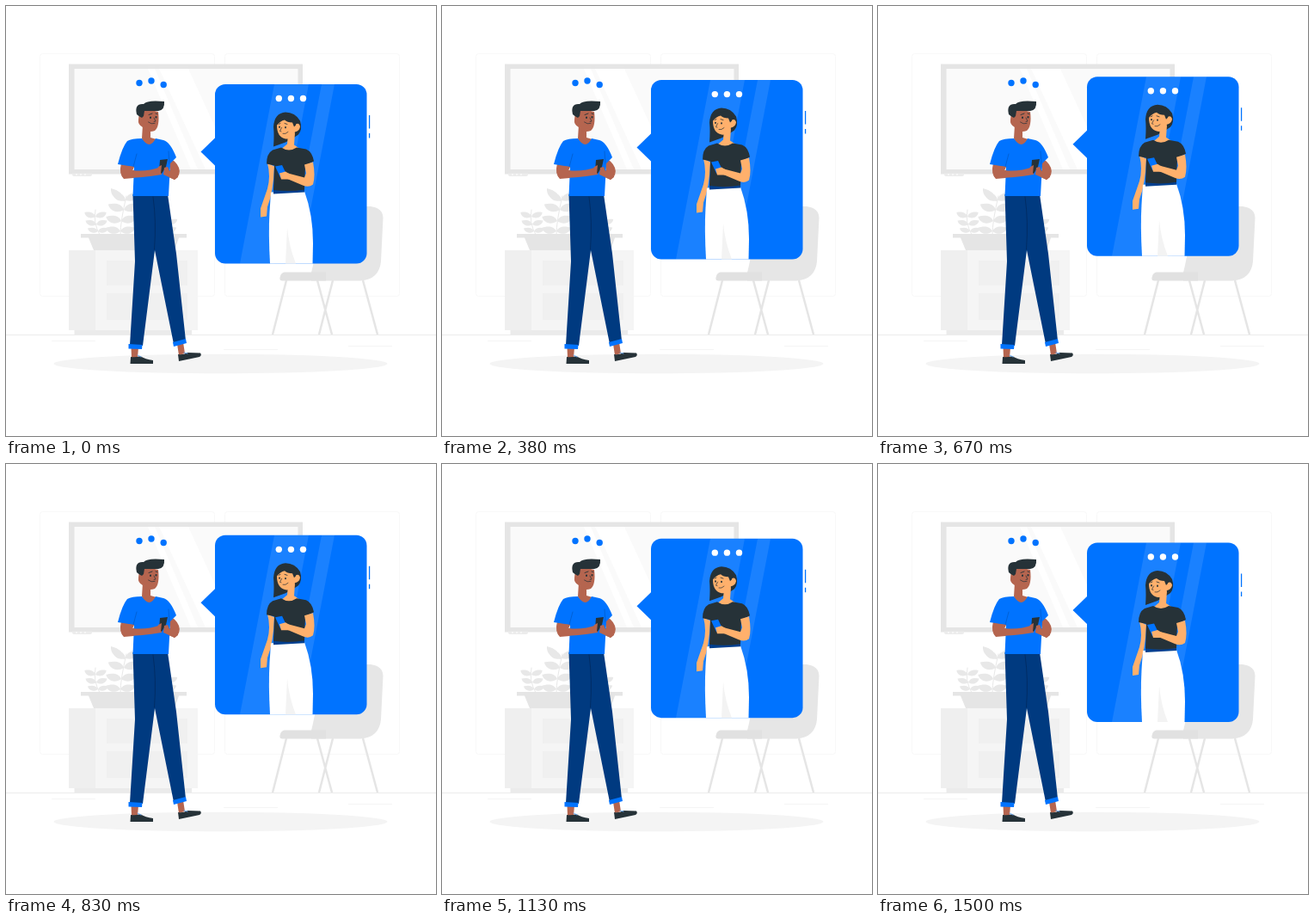
Recreate the animation shown at these times as an HTML page. Size 500 by 500 pixels, loop 1540 ms.

```html
<!DOCTYPE html>
<html lang="en">
<head>
<meta charset="utf-8">
<title>Video chat</title>
<style>
html, body { margin: 0; width: 100%; height: 100%; overflow: hidden; background: #fff; }
svg { display: block; width: 100%; height: 100%; }
.line { fill: none; stroke-linecap: round; stroke-linejoin: round; }
</style>
</head>
<body>
<svg viewBox="0 0 500 500">
  <defs>
    <path id="leaf" d="M0 0C2-7 9-8 16-7 15 0 8 4 0 0"/>
  </defs>

  <g id="room">
    <g fill="none" stroke="#f8f8f8">
      <rect x="39.5" y="55.5" width="203" height="282" rx="3"/>
      <rect x="254.5" y="55.5" width="203" height="282" rx="3"/>
    </g>
    <path d="M0 382.5H500" stroke="#ececec"/>
    <path d="M53 389.5H104M253 399.5H316M398 395.5H449" stroke="#f5f5f5"/>

    <path d="M73 67.500H345V195.500H73Z" fill="#e5e5e5"/>
    <path d="M79.500 73H339.500V190H79.500Z" fill="#fafafa"/>
    <path d="M165 73H173L223 190H215ZM178 73H212L266 190H232Z" fill="#fff"/>
    <path d="M77 194.500H100V196Q100 198 98 198H79Q77 198 77 196Z" fill="#ececec"/>
    <path d="M81 196H83M86 196H88M91 196H93" stroke="#fff"/>

    <path d="M104 284H223V377H104Z" fill="#f5f5f5"/>
    <path d="M73 284H104V377H73Z" fill="#efefef"/>
    <path d="M117 296H211V325H117ZM117 334H211V365H117Z" fill="#f0f0f0"/>
    <path d="M79.500 377H216V382H79.500Z" fill="#ebebeb"/>
    <g id="plants" fill="#e8e8e8">
      <path class="line" d="M109 266Q101 252 104 237M133 266Q133 250 140 221M184 266 190 246" stroke="#e8e8e8"/>
    </g>
    <path d="M87 265H210V269.500H201L196 284H102L96 269.500H87Z" fill="#e5e5e5"/>

    <path d="M326 319 310 382M362 319 379 382M380 319 364 382M415 319 432 382" stroke="#e5e5e5" stroke-width="2.500"/>
    <path d="M355 310Q360 290 366 250 370 234 390 233H424Q438 235 438.500 246L436 297Q434 318 412 319.500H355Z" fill="#e6e6e6"/>
    <path d="M324 309.500H372V319.500H321Q317 319 319 314 320 310 324 309.500Z" fill="#e1e1e1"/>
    <ellipse cx="249.500" cy="416" rx="194" ry="11.300" fill="#f4f4f4"/>
  </g>

  <g id="man">
    <g fill="#b5654f">
      <path d="M145.500 397H154L153 409H146ZM199 393 206 391 208 404 201 406Z"/>
      <path d="M159 138 168 145V153L175 155Q174 164 167 163 160 161 158 154Z"/>
      <path d="M155 124Q165 119 177 123 179 140 173 145 164 148 159 141Q153 138 154 132Z"/>
    </g>
    <path d="M152 126Q149 113 160 114 164 109 184 111 185 121 177 122 172 122 161 122L160 128 158 130Q154 128 152 126Z" fill="#263238"/>
    <g class="line" stroke="#263238">
      <path d="M166 126.500 170 125M174 125 176 125.500" stroke-width=".900"/>
      <path d="M168 129.500V130M174.500 129V129.500" stroke-width="2"/>
      <path d="M172 130 174 134 172 134.500M165.500 135Q169 138 173 136.500" stroke-width=".700"/>
    </g>

    <path d="M147.500 219H188L198 288 209 389 195 393 173 284 159 395 144 394 150 297Z" fill="#003a80"/>
    <path class="line" d="M171 222Q175 250 172.500 283" stroke="#00285a" stroke-width=".700"/>
    <path d="M142.500 393 158.500 394 158 399 142.500 398.500ZM194 391 209 387 210 392 195 396Z" fill="#0073ff"/>
    <path d="M145 408Q151 409 156 407 162 411 171 412V416H144.500ZM200 405Q206 406 211 403L226 403.500Q228 406 225 408L201 413Z" fill="#263238"/>
    <path class="line" d="M153 406 157 408M207 403 211 404" stroke="#70b1ff"/>

    <path d="M134 183Q131 195 137 201 158 200 180 196L179 188Q164 192 147 191L150 184Z" fill="#b5654f"/>
    <path d="M188 178Q196 177 201 188 204 196 196 202L187 198 183 194 185 188 191 191Z" fill="#b5654f"/>
    <path d="M158 154Q167 168 174 154L183 156Q191 158 198 176L191 183 189 221H147.500L149 187 130 184Q135 164 141 157 146 154 158 154Z" fill="#0073ff"/>
    <path class="line" d="M152 172 148 187M189 169 190 184" stroke="#0059c4" stroke-width=".700"/>
    <path d="M134 185.500Q132 196 137 200 158 200 181 196L180 187Q164 193 147 191L149 187Z" fill="#b5654f"/>
    <path d="M179 179 188 178 186 187 181 195 178 192Z" fill="#263238"/>
    <path d="M177 187 181 185 180 195 175 196ZM184 188 188 187 190 192 201 190 200 199 196 202 183 196Z" fill="#b5654f"/>
    <g fill="#0073ff">
      <circle cx="155" cy="89.500" r="3.700"/>
      <circle cx="169" cy="87" r="3.700"/>
      <circle cx="183.200" cy="91.500" r="3.700"/>
    </g>
  </g>

  <g id="call">
    <g fill="#0073ff">
      <rect x="243" y="91.500" width="176.500" height="208.500" rx="12"/>
      <path d="M244 153 226.500 170 244 187Z"/>
      <path d="M421.900 127.500H423.200V143H421.900ZM421.900 148.500H423.200V154H421.900Z"/>
    </g>
    <path d="M312 91.500H352L312 300H272ZM367 91.500H382L342 300H327Z" fill="#fff" opacity=".1"/>
    <g fill="#fff">
      <circle cx="317.300" cy="108" r="3.700"/>
      <circle cx="331.400" cy="108" r="3.700"/>
      <circle cx="345.500" cy="108" r="3.700"/>
    </g>

    <path d="M311 164Q312 151 311 141 312 125 325 124 336 124 342 134 345 144 340 150L334 154 325 159Z" fill="#263238"/>
    <g fill="#ffb06c">
      <path d="M304 183Q308 199 304 213L296 236V246L303 245 304 234Q311 216 312 187Z"/>
      <path d="M328 149 336 148 335 162 341 166Q334 173 320 167L327 161Z"/>
      <path d="M315 139Q318 133 327 131 335 133 335 139 341 135 342 141 341 146 336 147 334 156 325 155 315 153 315 139Z"/>
    </g>
    <path d="M314 140Q314 133 322 129L332 128Q339 132 337 139L335 141 333 136Q327 136 324 133 319 134 314 140Z" fill="#263238"/>
    <g class="line" stroke="#263238">
      <path d="M317 138 319 137M324 137 327 138" stroke-width=".800"/>
      <path d="M318 141V141.500M325 141.500V142" stroke-width="1.800"/>
      <path d="M320.500 142 318.500 146 320 146.500M322 149Q325 150 328 147" stroke-width=".700"/>
    </g>

    <path d="M308 217 347 216Q357 243 357 276L356.500 300H307Q305 265 306.500 240Z" fill="#fff"/>
    <path d="M327 258 325 300H337Q329 280 327 258Z" fill="#f3f3f3"/>
    <path d="M311 213 347 212V217L311 219Z" fill="#003f8f"/>
    <path d="M320 165Q329 171 338 165L349 167Q356 170 358 181L348 186 347 214Q329 217 311 214.500L312 186 303 184Q303 172 310 168Z" fill="#263238"/>
    <path d="M347 185 357 182Q360 198 357 208 352 212 345 209L326 201 328 195 347 200 349 195Z" fill="#ffb06c"/>
    <path d="M313 187 321 185.500 327 198 319 200Z" fill="#0073ff"/>
    <path d="M318 195 325 193 330 196 329 202 320 202Z" fill="#ffb06c"/>
  </g>
</svg>
<script>
const plants = document.getElementById('plants');
const call = document.getElementById('call');

// Leaves grow in pairs: stem x, y, leaf size, leaf tilt.
const leafPairs = [
  [107, 262, .72, 8], [105, 254, .76, 4], [104, 245, .78, 2],
  [133, 262, 1, 10], [134, 250, 1.05, 8], [137, 237, 1.1, 4], [139, 226, 1, -8],
  [185, 262, .8, 5], [188, 253, .7, 0]
];
for (const [x, y, size, tilt] of leafPairs) {
  for (const side of [-1, 1]) {
    plants.insertAdjacentHTML('beforeend',
      `<use href="#leaf" transform="translate(${x} ${y}) scale(${side * size} ${size}) rotate(${tilt})"/>`);
  }
}
plants.insertAdjacentHTML('beforeend',
  '<path d="M139 227Q121 225 122 212 136 215 139 227"/>');

const LOOP = 1540, STEPS = 37, LIFT = 10;
const start = performance.now();

function draw(now) {
  const time = Math.max(0, now - start) % LOOP;
  const step = Math.floor((time + 5) * 24 / 1000);
  const phase = (step + 1) % STEPS / STEPS;
  const lift = LIFT * (1 - Math.abs(1 - 2 * phase));
  call.setAttribute('transform', `translate(0 ${-lift})`);
  requestAnimationFrame(draw);
}
draw(start);
</script>
</body>
</html>
```
